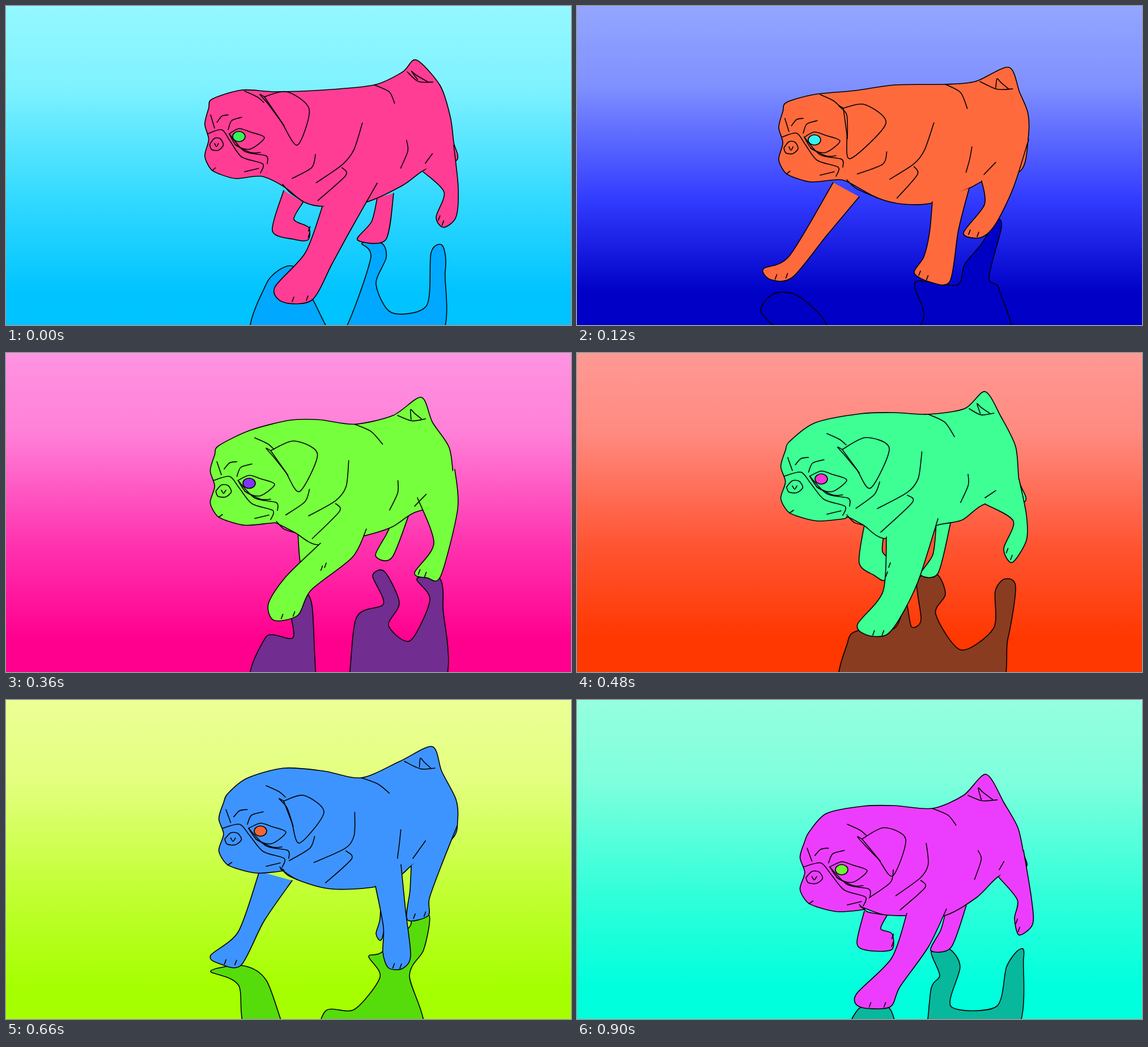
Recreate the animation shown at these times as an HTML page with a canvas. Size 997 px wide and 562 px high, loop 960 ms.

```html
<!DOCTYPE html>
<html lang="en">
<head>
<meta charset="utf-8">
<title>Walking pug</title>
<style>
html, body { margin: 0; width: 100%; height: 100%; overflow: hidden; }
canvas { display: block; }
</style>
</head>
<body>
<canvas id="stage" width="997" height="562"></canvas>
<script>
const W = 997, H = 562, STEP = 60, COUNT = 16;
const LEGS = ['hindFar', 'foreFar', 'hindNear', 'foreNear'];
const SHAPES = ['eye', 'ear', 'torso', ...LEGS];

const points = s => s.split(' ').map(p => p.split(',').map(Number));
const mix = (a, b, k) => Array.isArray(a) ? a.map((v, i) => mix(v, b[i], k)) : a + (b - a) * k;
const rgb = hex => [1, 3, 5].map(i => parseInt(hex.slice(i, i + 2), 16));

// Face and head front, measured from the eye.
const headFront = points('40,70 -6,74 -40,66 -58,57 -70,34 -62,5 -70,-22 -62,-50 -55,-66');
const face = [
  '-20,-5 0,-14 20,-8 45,2 20,22 -5,16 -20,-5',
  '-8,14 20,28 38,28',
  '-22,-12 -15,-28 5,-34',
  '-45,-25 -35,-36 -22,-38',
  '-58,-38 -50,-15',
  '-60,14 -50,3 -38,4 -32,15 -42,24 -56,23 -60,14',
  '-50,12 -46,18 -42,12',
  '-64,-5 -35,-12 -18,8 5,36 42,48 38,64',
  '-20,-5 10,26 48,34 50,48',
  '-55,60 -48,55',
  '10,62 35,56',
  '10,-80 32,-70 44,-60'
].map(points);

// Body creases, drawn on the CREASED pose and carried along by the outline.
const CREASED = 4;
const creases = [
  '601,205 598,250 580,275 538,300',
  '580,280 585,295 545,338',
  '537,253 530,275 495,297',
  '610,143 640,155 663,174',
  '693,236 692,260 677,290',
  '744,255 722,285',
  '690,122 720,130 745,126',
  '718,128 722,110 728,116 738,126',
  '478,308 492,322 515,330'
].map(points);

const poses = [];
function pose(at, hue, sky, eyeHue, shade, parts) {
  const p = { at, hue, sky, eyeHue, low: at === 2 ? 39 : 50, shade: rgb(shade) };
  for (const n in parts) p[n] = points(parts[n]);
  poses.push(p);
}

pose(0, 333, 194, 132, '#00a8ff', {
  eye: '411,230', ear: '456,160 535,182 514,245',
  torso: '416,148 475,151 560,148 650,139 700,116 724,95 766,140 784,195 790,240 795,272 740,288 700,316 634,346 560,353 525,345 490,318',
  foreNear: '655,312 605,400 575,455 540,518 490,522 474,496 528,435 558,354',
  foreFar: '490,325 470,396 508,411 533,412 534,390 508,376 524,346',
  hindNear: '790,245 798,320 794,372 772,390 759,372 773,328 736,292',
  hindFar: '684,330 670,412 620,412 645,380 655,338',
  shadow: '448,600 458,492 505,458 540,515 588,585 643,447 628,418 663,418 671,443 653,490 680,540 742,528 750,435 770,422 775,468 748,600'
});
pose(2, 374, 240, 181, '#0000c4', {
  eye: '419,236', ear: '470,180 545,207 482,269',
  torso: '418,156 490,149 562,139 650,138 703,133 762,108 781,152 796,190 796,235 783,290 718,308 692,321 627,347 575,349 530,338 478,310',
  foreNear: '692,321 673,395 658,485 622,486 595,470 612,442 622,400 627,345',
  foreFar: '452,311 375,440 329,463 342,482 380,478 440,405 498,336',
  hindNear: '797,235 770,320 738,385 712,408 682,400 719,350 714,308',
  hindFar: '672,345 655,440 640,440 640,400 640,345',
  shadow: '410,585 327,543 345,508 385,508 430,545 470,600 570,600 612,548 597,486 670,492 684,455 713,420 740,378 749,390 727,478 745,500 745,600'
});
pose(4, 418, 280, 219, '#581eff', {
  eye: '427,237', ear: '466,174 548,188 518,250',
  torso: '440,150 500,130 545,130 610,143 682,122 745,88 757,132 790,168 799,215 795,255 722,296 680,320 612,345 555,349 515,330 480,312',
  foreNear: '676,288 655,365 650,405 657,450 643,460 597,425 600,395 612,345',
  foreFar: '464,308 455,425 412,465 425,485 472,484 493,420 514,331',
  hindNear: '797,235 785,320 755,432 725,440 697,433 738,372 724,296',
  hindFar: '655,335 640,410 625,415 620,380 630,340',
  shadow: '472,600 460,515 417,482 478,475 495,510 508,600 540,600 560,545 635,487 712,465 697,440 750,438 767,460 768,540 745,600'
});
pose(8, 507, 373, 310, '#893c20', {
  eye: '431,222', ear: '468,170 551,168 518,238',
  torso: '420,123 500,107 560,105 620,108 684,98 720,68 748,112 774,165 780,225 790,262 720,266 680,294 637,303 546,327 505,303 478,289',
  foreNear: '637,292 602,402 568,470 545,497 512,497 495,478 540,420 546,324',
  foreFar: '507,303 498,370 525,392 543,400 553,368 539,350 541,322',
  hindNear: '780,222 793,285 793,330 768,369 753,345 770,296 720,266',
  hindFar: '659,300 637,388 606,390 628,355 634,300',
  shadow: '478,600 478,508 500,488 560,485 580,440 590,482 607,470 600,400 635,390 650,425 633,460 677,523 735,485 738,420 755,398 774,412 760,505 730,600'
});
pose(11, 573, 441, 375, '#55dc0a', {
  eye: '449,231', ear: '490,178 561,198 518,252',
  torso: '425,138 490,120 560,125 627,137 695,108 752,82 769,126 794,175 797,212 787,245 718,290 697,308 652,329 575,333 515,317 485,298',
  foreNear: '697,290 705,370 714,450 700,473 675,472 665,445 666,400 652,328',
  foreFar: '447,302 410,408 361,450 378,465 415,467 455,390 505,318',
  hindNear: '796,222 768,292 747,350 745,380 708,387 713,335 715,292',
  hindFar: '680,330 664,419 653,412 660,385 662,330',
  shadow: '445,600 410,502 361,478 418,468 460,495 500,600 540,600 565,547 615,545 660,488 640,452 662,445 712,400 716,382 747,380 737,440 712,485 724,600'
});
pose(13, 616, 485, 416, '#00e01e', {
  eye: '474,277', ear: '507,222 583,245 540,300',
  torso: '445,182 500,165 560,164 635,177 687,163 723,125 770,163 806,205 815,245 812,285 745,302 705,342 655,368 580,378 540,360 508,340',
  foreNear: '658,355 633,405 560,463 537,507 495,516 485,487 515,440 577,380',
  foreFar: '537,358 541,412 552,425 575,430 588,420 590,400 580,375',
  hindNear: '814,250 819,320 789,438 765,441 743,432 777,380 748,300',
  hindFar: '742,303 704,404 674,402 693,365 705,340',
  shadow: '470,600 480,546 528,547 525,500 545,470 562,490 574,600 622,600 640,512 688,487 669,438 690,430 716,485 697,525 735,552 770,480 747,443 786,440 793,490 778,600'
});
pose(15, 654, 532, 461, '#08b89c', {
  eye: '467,299', ear: '503,245 580,245 557,310',
  torso: '440,200 505,187 560,186 627,191 682,168 722,131 754,182 778,225 788,270 792,295 745,310 705,348 648,380 580,380 540,378 500,364',
  foreNear: '652,368 620,435 570,505 552,541 500,541 493,518 555,455 582,376',
  foreFar: '507,372 494,428 512,441 555,440 556,412 536,403 548,378',
  hindNear: '788,265 802,350 804,395 780,414 772,385 777,352 744,312',
  hindFar: '687,362 660,436 624,441 642,405 650,375',
  shadow: '500,600 496,545 550,542 572,600 612,600 625,508 640,485 625,443 656,438 676,470 660,540 740,540 758,470 780,440 788,455 760,600'
});

// Moves a point along with the outline points close to it.
function warp(from, to, names) {
  const a = names.flatMap(n => from[n]), b = names.flatMap(n => to[n]);
  return ([x, y]) => {
    if (y > 560) return [x, y];
    let sum = 0, dx = 0, dy = 0;
    a.forEach(([ax, ay], i) => {
      const w = 1 / ((ax - x) ** 2 + (ay - y) ** 2 + 20) ** 2;
      sum += w;
      dx += w * (b[i][0] - ax);
      dy += w * (b[i][1] - ay);
    });
    return [x + dx / sum, y + dy / sum];
  };
}

function blend(p, q, k) {
  const out = {};
  for (const n of ['at', 'hue', 'sky', 'low', 'eyeHue', 'shade', ...SHAPES]) out[n] = mix(p[n], q[n], k);
  const near = k < 0.5 ? p : q;
  out.shadow = near.shadow.map(warp(near, out, LEGS));
  return out;
}

// The passing pose of the first stride borrows the legs of the second one.
const find = at => poses.find(p => p.at === at);
const passing = blend(find(4), find(8), 0.5), later = find(13);
for (const n of [...LEGS, 'shadow']) {
  passing[n] = later[n].map(([x, y]) => [x - 22, y > 560 ? y : y - 45]);
}
poses.push(passing);
poses.sort((a, b) => a.at - b.at);

const scenes = Array.from({ length: COUNT }, (_, i) => {
  const n = poses.findIndex(p => p.at >= i), q = poses[n], p = poses[n - 1];
  return q.at === i ? q : blend(p, q, (i - p.at) / (q.at - p.at));
});

const ctx = document.getElementById('stage').getContext('2d');

function curve(pts, closed) {
  const n = pts.length;
  const at = i => closed ? pts[(i + n) % n] : pts[Math.max(0, Math.min(n - 1, i))];
  ctx.beginPath();
  ctx.moveTo(...pts[0]);
  for (let i = 0; i < (closed ? n : n - 1); i++) {
    const [a, b, c, d] = [at(i - 1), at(i), at(i + 1), at(i + 2)];
    ctx.bezierCurveTo(
      b[0] + (c[0] - a[0]) / 7, b[1] + (c[1] - a[1]) / 7,
      c[0] - (d[0] - b[0]) / 7, c[1] - (d[1] - b[1]) / 7, c[0], c[1]);
  }
}

function line(pts) {
  curve(pts, false);
  ctx.stroke();
}

function shape(pts, fill, closed) {
  curve(pts, closed);
  ctx.fillStyle = fill;
  ctx.fill();
  ctx.stroke();
}

function toes(pts, first) {
  for (const k of [0.2, 0.7]) {
    const [x, y] = mix(pts[first], pts[first + 1], k);
    line([[x, y], [x + 3, y - 8]]);
  }
}

function draw(s) {
  const sky = ctx.createLinearGradient(0, 0, 0, H);
  const stops = [[0, -10, 79], [0.25, -8, 75], [0.6, -3, 60], [0.9, 0, s.low]];
  for (const [pos, turn, light] of stops) sky.addColorStop(pos, `hsl(${s.sky + turn}, 100%, ${light}%)`);
  ctx.fillStyle = sky;
  ctx.fillRect(0, 0, W, H);

  ctx.strokeStyle = '#000';
  ctx.lineWidth = 1.6;
  ctx.lineCap = ctx.lineJoin = 'round';
  shape(s.shadow, `rgb(${s.shade.map(Math.round)})`, true);

  const [[ex, ey]] = s.eye, turn = Math.min(1.05, 0.86 + 0.02 * s.at);
  const onHead = ([x, y]) => [ex + (x < 0 ? x * turn : x), ey + y];
  const fur = `hsl(${s.hue}, 100%, 62%)`;
  shape(s.hindFar, fur);
  shape(s.foreFar, fur);
  shape([...s.torso, ...headFront.map(onHead)], fur, true);
  shape(s.hindNear, fur);
  shape(s.foreNear, fur);

  const onBody = warp(find(CREASED), s, ['torso']);
  for (const c of creases) line(c.map(onBody));
  for (const f of face) line(f.map(onHead));

  const [root, edge, tip] = s.ear, [mx, my] = mix(root, edge, 0.5);
  line([root, [mx, my - 20], edge, tip, mix(root, tip, 0.5), root]);
  line([root, [root[0] - 8, root[1] - 4], [root[0] + 6, root[1] + 12], mix(root, tip, 0.6)]);

  toes(s.foreNear, 3);
  toes(s.foreFar, 3);
  toes(s.hindNear, 3);

  ctx.beginPath();
  ctx.ellipse(ex, ey, 11, 9, 0, 0, Math.PI * 2);
  ctx.fillStyle = `hsl(${s.eyeHue}, 90%, 58%)`;
  ctx.fill();
  ctx.stroke();
}

const start = performance.now();
let shown = -1;
function tick() {
  const i = Math.floor((performance.now() - start) / STEP) % COUNT;
  if (i !== shown) draw(scenes[shown = i]);
  requestAnimationFrame(tick);
}
tick();
</script>
</body>
</html>
```
